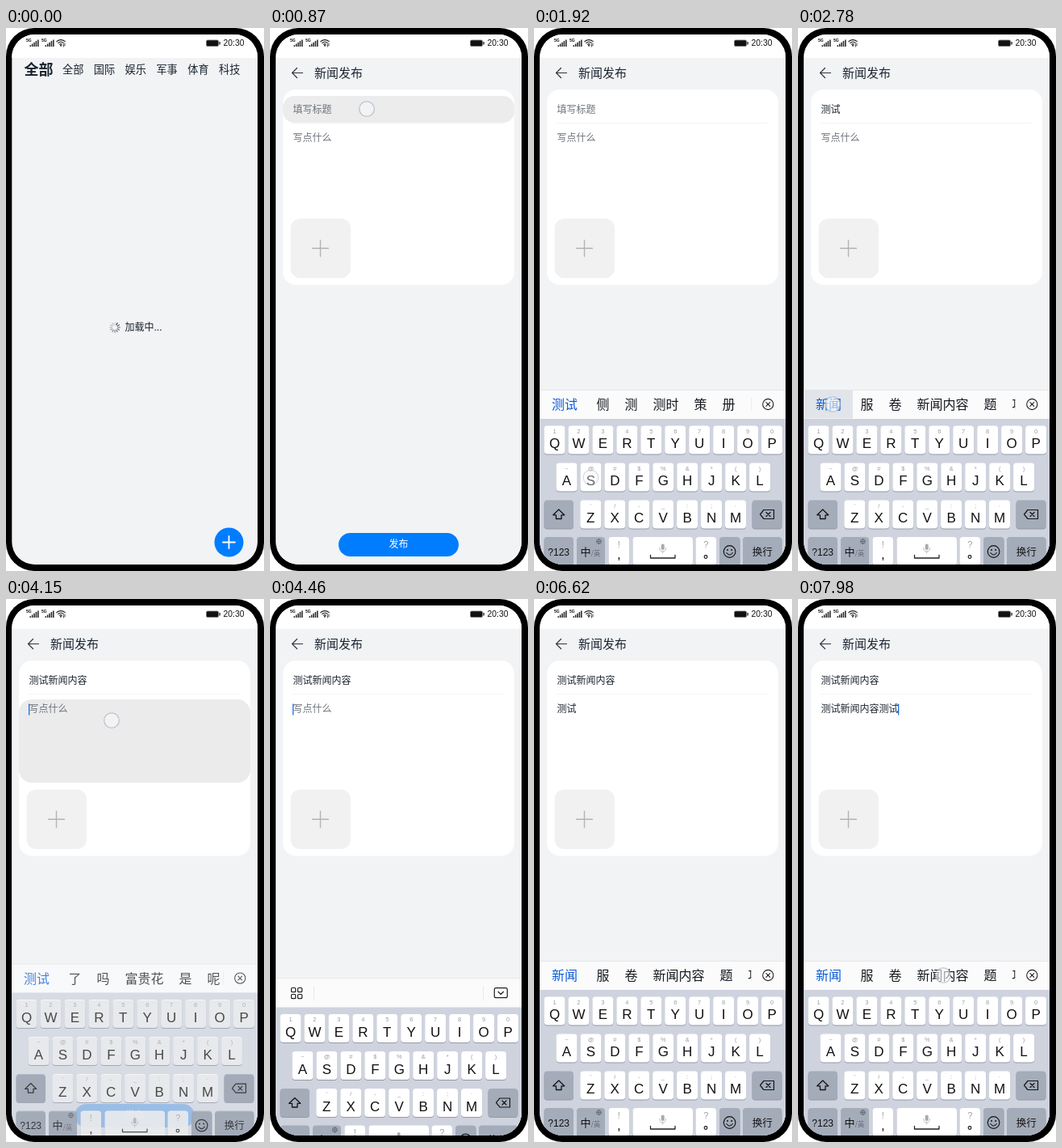
An HTML page with a canvas for the animation above (8000 ms loop, 320 px wide and 671 px high).

```html
<!DOCTYPE html>
<html lang="zh-CN">
<head>
<meta charset="utf-8">
<title>新闻发布</title>
<style>
html, body { margin: 0; width: 100%; height: 100%; overflow: hidden; background: #fff; }
canvas { display: block; width: 320px; height: 671px; }
</style>
</head>
<body>
<canvas id="stage"></canvas>
<script>
const LOOP = 8000, W = 320, H = 671;
const CJK = '"Noto Sans CJK SC", "Noto Sans CJK", sans-serif';
const LATIN = '"Liberation Sans", Arial, sans-serif';
const INK = '#1b2430', BLUE = '#0a5cd6', PAGE = '#f1f3f5';
const BAR_Y = 465, KEY_H = 35, KEY_W = 26;

const canvas = document.getElementById('stage');
const dpr = window.devicePixelRatio || 1;
canvas.width = W * dpr;
canvas.height = H * dpr;
const c = canvas.getContext('2d');

const clamp = v => Math.max(0, Math.min(1, v));
const progress = (t, start, length) => clamp((t - start) / length);
const easeOut = p => 1 - (1 - p) ** 3;
const latest = (steps, t) => steps.filter(s => s[0] <= t).pop();

// Drawing helpers
function box(x, y, w, h, r, fill, stroke, lw = 1) {
  c.beginPath();
  c.roundRect(x, y, w, h, r);
  paint(fill, stroke, lw);
}
function disc(x, y, r, fill, stroke, lw = 1) {
  c.beginPath();
  c.arc(x, y, r, 0, Math.PI * 2);
  paint(fill, stroke, lw);
}
function paint(fill, stroke, lw) {
  if (fill) { c.fillStyle = fill; c.fill(); }
  if (stroke) { c.strokeStyle = stroke; c.lineWidth = lw; c.stroke(); }
}
function path(d, color, lw = 1, x = 0, y = 0) {
  c.save();
  c.translate(x, y);
  c.strokeStyle = color;
  c.lineWidth = lw;
  c.lineCap = c.lineJoin = 'round';
  c.stroke(new Path2D(d));
  c.restore();
}
function text(s, x, cy, size, color = INK, { weight = 400, align = 'left', font = CJK } = {}) {
  c.font = `${weight} ${size}px ${font}`;
  c.textAlign = align;
  c.fillStyle = color;
  c.fillText(s, x, cy + size * 0.37);
}
const centered = (s, x, y, size, color, font = LATIN) =>
  text(s, x, y, size, color, { align: 'center', font });

// Timeline
const AFTER_TEST = ['新闻', '服', '卷', '新闻内容', '题', '项'];
const AFTER_CONTENT = ['测试', '了', '吗', '富贵花', '是', '呢'];
const AFTER_NEWS = ['内容', '发布', '稿', '报道', '类', '中'];
const COMPOSING = ['测试', '侧', '测', '测时', '策', '册'];

const bars = [
  [0, null], [1610, COMPOSING], [2350, AFTER_TEST], [2970, AFTER_NEWS],
  [3830, AFTER_CONTENT], [4300, null], [5220, COMPOSING],
  [6190, AFTER_TEST], [6860, AFTER_CONTENT], [7600, AFTER_TEST]
];
const titles = [[0, ''], [2350, '测试'], [2970, '测试新闻'], [3830, '测试新闻内容']];
const bodies = [[0, ''], [6190, '测试'], [6860, '测试新闻内容'], [7600, '测试新闻内容测试']];
const caretResets = [1050, 2350, 2970, 3830, 4080, 6190, 6860, 7600];
const BODY_FOCUS = 4080;

const rows = [
  { y: 491.5, x: 12.5, keys: 'QWERTYUIOP', hints: '1234567890' },
  { y: 537.5, x: 27.5, keys: 'ASDFGHJKL', hints: '~@#$%&*()' },
  { y: 583.5, x: 57.3, keys: 'ZXCVBNM', hints: "'/-_:;·" }
];
const keyCenter = letter => {
  const row = rows.find(r => r.keys.includes(letter));
  return [row.x + row.keys.indexOf(letter) * 29.95 + 13, row.y + 18];
};
const typing = (start, step) => [...'CESHI'].map((letter, i) => {
  const [x, y] = keyCenter(letter);
  return { x, y, down: start + i * step, up: start + i * step + step * 0.65, letter };
});
const pick = (x, down, up) => ({ x, y: BAR_Y, down, up, first: x < 68 });
const taps = [
  { x: 120, y: 100, down: 750, up: 960 },
  ...typing(1610, 105),
  pick(43, 2155, 2350), pick(43, 2780, 2970), pick(43, 3640, 3830),
  { x: 131, y: 150, down: 4030, up: 4250 },
  ...typing(5220, 135),
  pick(43, 6000, 6190), pick(180, 6680, 6860), pick(43, 7300, 7600), pick(180, 7970, 8200)
];
const pressed = (tap, t) => t >= tap.down && t < tap.up;

function keyboardPose(t) {
  const show = start => {
    const p = progress(t, start, 300);
    return { dy: 216 * (1 - easeOut(p)), alpha: clamp(p * 2) };
  };
  if (t < 4100) return show(1243);
  if (t < 4300) {
    const p = progress(t, 4100, 200);
    return { dy: 216 * p ** 3, alpha: 1 - p };
  }
  return show(4300);
}

// Scene parts
function statusBar() {
  box(0, 0, W, 37, 0, '#fff');
  for (const x of [25, 44]) {
    text('5G', x, 15.5, 5, '#111', { weight: 700, font: LATIN });
    for (let i = 0; i < 5; i++) {
      const h = 1.8 + i * 1.7;
      box(x + 4.5 + i * 2.4, 23 - h, 1.5, h, 0, '#222');
    }
  }
  for (const r of [2.2, 4.8, 7.4]) {
    c.beginPath();
    c.arc(68, 22, r, -Math.PI * 0.77, -Math.PI * 0.23);
    paint(null, '#222', 1.1);
  }
  disc(68, 21.8, 1, '#222');
  path('M71.5 20v3M73 22v-3', '#222', 0.8);
  box(248.5, 15, 15, 7.5, 1.5, '#111', '#777', 0.8);
  box(264.3, 17, 1.5, 3.5, 0.5, '#333');
  text('20:30', 269.5, 18.5, 10.4, '#111', { font: LATIN });
}

function listPage(t) {
  text('全部', 22.5, 51, 18, INK, { weight: 700 });
  ['全部', '国际', '娱乐', '军事', '体育', '科技'].forEach((s, i) =>
    text(s, 70 + i * 38.8, 51, 13.2));
  const turn = Math.floor(t / 100);
  for (let i = 0; i < 12; i++) {
    const a = (i + turn) * Math.PI / 6 - Math.PI / 3;
    const [dx, dy] = [Math.cos(a), Math.sin(a)];
    c.globalAlpha = 0.9 - i * 0.065;
    path(`M${dx * 3.6} ${dy * 3.6}L${dx * 6.2} ${dy * 6.2}`, '#30363e', 1.2, 135, 370);
  }
  c.globalAlpha = 1;
  text('加载中...', 147.5, 369.5, 12);
  disc(276.5, 635.5, 18, '#007dff');
  path('M-7.5 0H7.5M0-7.5V7.5', '#fff', 1.8, 276.5, 635.5);
}

function field(value, hint, y) {
  text(value || hint, 28.5, y, 12, value ? INK : '#6c727b', { weight: value ? 500 : 400 });
}

function caret(t, value, y) {
  const reset = caretResets.filter(r => r <= t).pop();
  if (reset === undefined || (t - reset + 70) % 1000 >= 500) return;
  box(28 + value.length * 12, y - 7, 1.3, 14, 0, '#1f6fe0');
}

function editorPage(t) {
  box(0, 37, W, H, 0, PAGE);
  path('M40.5 55.5H27.5M33.5 49.5L27.5 55.5L33.5 61.5', '#30363e', 1.2);
  text('新闻发布', 55, 55, 15, INK, { weight: 500 });
  box(16, 76, 287, 241.5, 16, '#fff');
  const held = (start, end) => progress(t, start, 60) * (1 - progress(t, end, 120));
  c.globalAlpha = held(750, 960);
  box(16, 84, 287, 33, 14, '#ececec');
  c.globalAlpha = held(4030, 4250);
  box(16, 124, 287, 103, 16, '#ebebec');
  c.globalAlpha = 1;
  box(28, 117.3, 262, 1, 0, '#f3f3f4');

  const title = latest(titles, t)[1], body = latest(bodies, t)[1];
  field(title, '填写标题', 100.5);
  field(body, '写点什么', 136);
  if (t < BODY_FOCUS) caret(t, title, 101);
  else caret(t, body, 136.5);

  box(25.5, 235.5, 74.5, 73.5, 12, '#f1f1f2');
  path('M-10 0H10M0-10V10', '#b1b3b6', 1.4, 62.5, 272.3);
  box(85, 624, 149, 29, 14.5, '#007dff');
  text('发布', 159.5, 638, 12, '#fff', { align: 'center', weight: 500 });
}

function key(x, y, w, fill) {
  box(x, y + 1, w, KEY_H, 4, '#9299a8');
  box(x, y, w, KEY_H, 4, fill);
}

function toolbar(words, t) {
  box(0, 447, W, 36, 0, '#fbfbfc');
  box(0, 447, W, 0.8, 0, '#dfe1e5');
  if (!words) {
    for (const x of [26.5, 34.5])
      for (const y of [459, 467]) box(x, y, 5.2, 5.2, 1, null, '#222', 1.2);
    for (const x of [54, 264]) box(x, 457, 0.9, 18, 0, '#e6e7e9');
    box(278.3, 459.2, 16, 12, 2, null, '#222', 1.2);
    path('M-3.3-1.5L0 1.7L3.3-1.5', '#222', 1.2, 286.3, 465.3);
    return;
  }
  if (taps.some(tap => tap.first && pressed(tap, t))) box(0, 447, 68, 35.5, 0, '#e1e4e9');
  c.save();
  c.beginPath();
  c.rect(0, 447, 270, 36);
  c.clip();
  let x = 77.5;
  words.forEach((word, i) => {
    text(word, i ? x : 22, BAR_Y, 16, i ? '#15191f' : BLUE);
    if (i) x += word.length * 16 + 19;
  });
  c.restore();
  box(269.3, 457, 0.8, 16, 0, '#e6e7e9');
  disc(290.3, 465, 6.6, null, '#222', 1.1);
  path('M-2.4-2.4L2.4 2.4M2.4-2.4L-2.4 2.4', '#222', 1.1, 290.3, 465);
}

function keyboard(t) {
  const { dy, alpha } = keyboardPose(t);
  if (alpha <= 0) return;
  c.save();
  c.globalAlpha = alpha;
  c.translate(0, dy);
  const dark = '#a4acba', gray = '#9a9da3';
  box(0, 482.5, W, 220, 0, '#cfd3de');
  toolbar(latest(bars, t)[1], t);

  const held = taps.find(tap => tap.letter && pressed(tap, t));
  for (const row of rows) {
    [...row.keys].forEach((letter, i) => {
      const x = row.x + i * 29.95;
      key(x, row.y, KEY_W, held && held.letter === letter ? '#dde0e7' : '#fff');
      centered(row.hints[i], x + 13, row.y + 6.5, 7.5, gray);
      centered(letter, x + 13, row.y + 21.5, 17, '#111');
    });
  }
  key(12.5, 583.5, 36.5, dark);
  path('M0-6L7 .8H3.3V5.5H-3.3V.8H-7Z', '#151515', 1.3, 30.7, 601);
  key(270.5, 583.5, 37, dark);
  path('M-8.5 0L-4-5.5H8.5V5.5H-4Z', '#151515', 1.2, 289, 601);
  path('M-1-2.5L4 2.5M4-2.5L-1 2.5', '#151515', 1.2, 289, 601);

  const y = 629;
  [[12.5, 36.5, dark], [53, 35, dark], [92.5, 25.5, '#fff'], [122.5, 74.5, '#fff'],
   [200.5, 25.5, '#fff'], [230, 25.5, dark], [259, 48.5, dark]]
    .forEach(([x, w, fill]) => key(x, y, w, fill));
  centered('?123', 30.7, 647.3, 12, '#111');
  text('中', 57.5, 647, 13, '#111');
  text('/英', 70.8, 649, 8.2, '#5e6470');
  disc(80.5, 634.5, 2.8, null, '#4d535d', 0.8);
  path('M77.7 634.5H83.3M80.5 631.7V637.3', '#4d535d', 0.6);
  centered('!', 105.3, 637.5, 11, gray);
  centered(',', 105.3, 650, 17, '#111');
  centered('?', 213.3, 637.5, 11, gray);
  disc(213, 653.5, 1.9, null, '#111', 1.1);
  box(157.7, 637.5, 4, 7.5, 2, '#a8aaae');
  path('M155.8 642.5Q156 647 159.7 647T163.6 642.5M159.7 647V649', '#b3b5b9', 0.9);
  path('M144.5 651.5V655H175V651.5', '#222', 1.3);
  disc(242.6, 647, 7.3, null, '#151515', 1.2);
  disc(240, 645, 1, '#151515');
  disc(245.2, 645, 1, '#151515');
  path('M238.8 648.5Q242.6 653.5 246.4 648.5', '#151515', 1.1);
  centered('换行', 283.3, 647, 12.5, '#111', CJK);
  c.restore();
}

function pointers(t) {
  for (const tap of taps) {
    if (t < tap.down) continue;
    c.globalAlpha = 1 - progress(t, tap.up, 90);
    if (c.globalAlpha > 0) disc(tap.x, tap.y, 9.3, 'rgba(246,248,252,.6)', 'rgba(150,160,178,.65)', 1.1);
  }
  c.globalAlpha = 1;
}

function draw(t) {
  c.setTransform(dpr, 0, 0, dpr, 0, 0);
  box(0, 0, W, H, 0, '#fff');
  box(0, 0, W, H, 35, '#000');
  c.save();
  c.beginPath();
  c.roundRect(7.3, 8, 304.7, 655, 28);
  c.clip();
  box(0, 0, W, H, 0, PAGE);
  const slide = easeOut(progress(t, 45, 265));
  if (slide < 1) listPage(t);
  if (slide > 0) {
    c.save();
    c.translate((1 - slide) * 305, 0);
    editorPage(t);
    c.restore();
  }
  statusBar();
  keyboard(t);
  pointers(t);
  c.restore();
}

const begin = performance.now();
function tick() {
  draw((performance.now() - begin) % LOOP);
  requestAnimationFrame(tick);
}
tick();
</script>
</body>
</html>
```
